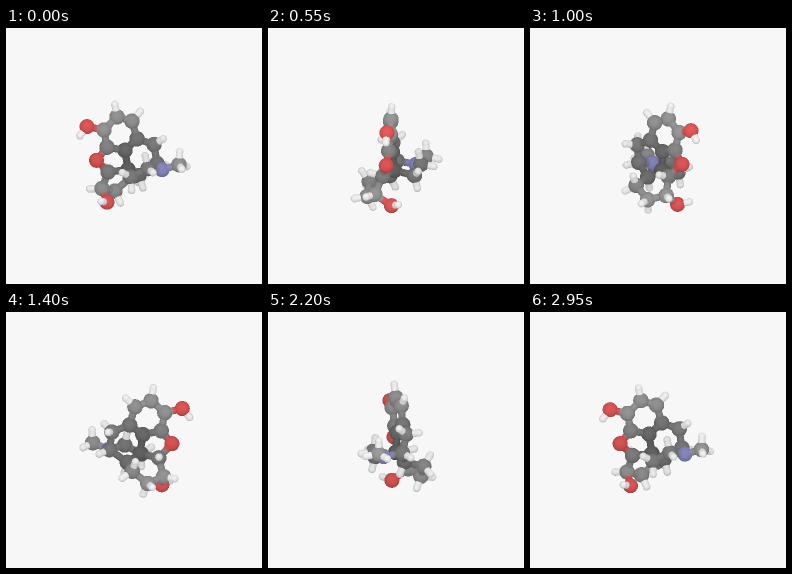
An HTML page with a canvas for the animation above (3 s loop, 256x256 px).

```html
<!DOCTYPE html>
<html lang="en">
<head>
<meta charset="utf-8">
<title>Rotating molecule</title>
<style>
html, body { margin: 0; width: 100%; height: 100%; overflow: hidden; background: #f7f7f7; }
canvas { display: block; width: 256px; height: 256px; }
</style>
</head>
<body>
<canvas id="stage" width="512" height="512"></canvas>
<script>
const LOOP = 3000, STEP = 50, SIZE = 512, SCALE = 2, TILT = 0.17;
const H_LENGTH = 13, BOND_MAX = 24.5, STICK = 3.6, BACK = 247;
// dim: how strongly the crowded middle darkens the colour
const KINDS = {
  C: { r: 7.7, rgb: [152, 152, 152], dim: 1 },
  O: { r: 7.5, rgb: [226, 88, 88], dim: 0.7 },
  N: { r: 7.5, rgb: [150, 150, 210], dim: 0.7 },
  H: { r: 3.8, rgb: [241, 241, 241], dim: 0.3 }
};

// kind, x, y, z, attached hydrogens
const heavy = [
  ['C', -2, 94, -5, 1], ['C', -17, 88.5, 2, 1], ['C', -30, 100.8, 7, 0],
  ['C', -27, 118.5, 4, 0], ['C', -9, 122.3, 0, 0], ['C', 3, 112, -7, 0],
  ['O', -47, 96.7, 11, 0], ['O', -37.5, 131.3, 6, 0], ['C', -26, 144.5, -3, 1],
  ['C', -32, 162, -9, 1], ['O', -27, 173, 7, 0], ['C', -19, 167, -23, 2],
  ['C', -4, 154.5, -27.5, 2], ['C', 5, 149, -9, 1], ['C', -6, 141.5, 1, 0],
  ['C', 23, 137, -9, 1], ['C', 20, 118.7, -12.5, 2], ['N', 28, 140, 9.5, 0],
  ['C', 45, 134.5, 13, 3], ['C', 14, 137, 21, 2], ['C', -3, 145.5, 21.5, 2]
];

const add = (a, b, k = 1) => a.map((v, i) => v + b[i] * k);
const dot = (a, b) => a[0] * b[0] + a[1] * b[1] + a[2] * b[2];
const unit = a => a.map(v => v / Math.hypot(...a));
const cross = (a, b) => [
  a[1] * b[2] - a[2] * b[1], a[2] * b[0] - a[0] * b[2], a[0] * b[1] - a[1] * b[0]
];

const atoms = heavy.map(([kind, x, y, z]) => ({ kind, p: [x, y - 128, z], near: [] }));
const bonds = [];

function link(a, b) {
  bonds.push([a, b]);
  a.near.push(b);
  b.near.push(a);
}

function addH(a, p) {
  const h = { kind: 'H', p, near: [] };
  atoms.push(h);
  link(a, h);
}

const towards = (a, b) => unit(add(b.p, a.p, -1));

function methylDirs(a) {
  const n = a.near[0], axis = towards(n, a);
  const sides = n.near.filter(b => b !== a).map(b => {
    const v = towards(n, b);
    return unit(add(v, axis, -dot(v, axis)));
  });
  const fans = sides.map(v => v.map(c => -c));
  fans.push(unit(add(sides[0], sides[1])));
  return fans.map(v => add(axis.map(c => c * 0.33), v, 0.94));
}

function hydrogenDirs(a, count) {
  if (count === 3) return methylDirs(a);
  const us = a.near.map(b => towards(a, b));
  const out = unit(us.reduce((s, u) => add(s, u, -1), [0, 0, 0]));
  if (count === 1) return [out];
  const side = unit(cross(us[0], us[1]));
  return [0.82, -0.82].map(k => add(out.map(c => c * 0.58), side, k));
}

for (let i = 0; i < heavy.length; i++) {
  for (let j = 0; j < i; j++) {
    if (Math.hypot(...add(atoms[i].p, atoms[j].p, -1)) < BOND_MAX) link(atoms[j], atoms[i]);
  }
}
heavy.forEach((row, i) => {
  if (!row[4]) return;
  const a = atoms[i];
  for (const d of hydrogenDirs(a, row[4])) addH(a, add(a.p, d, H_LENGTH));
});
addH(atoms[6], [-54, -22.5, 13]);
addH(atoms[10], [-33, 42.5, 17]);

const ctx = document.getElementById('stage').getContext('2d');
const image = ctx.createImageData(SIZE, SIZE);
const pixels = image.data;
const depth = new Float32Array(SIZE * SIZE);

function ball([x, y, z], radius, { rgb, dim }) {
  const cx = (128 + x) * SCALE, cy = (128 + y) * SCALE, r = radius * SCALE;
  const open = Math.min(1, Math.hypot(x, y - 6, z) / 42);
  const fade = 1 - dim * (0.42 * (1 - open) + 0.04 - z * 0.0015);
  for (let py = Math.ceil(cy - r - 0.5); py + 0.5 < cy + r; py++) {
    for (let px = Math.ceil(cx - r - 0.5); px + 0.5 < cx + r; px++) {
      const dx = (px + 0.5 - cx) / r, dy = (py + 0.5 - cy) / r;
      const rest = 1 - dx * dx - dy * dy;
      if (rest <= 0) continue;
      const nz = Math.sqrt(rest), d = z + nz * radius, at = py * SIZE + px;
      if (d <= depth[at]) continue;
      depth[at] = d;
      const light = (0.75 + 0.25 * nz - 0.06 * dy) * fade;
      for (let c = 0; c < 3; c++) pixels[at * 4 + c] = rgb[c] * light;
    }
  }
}

function stick(a, b) {
  const n = 18;
  for (let i = 0; i <= n; i++) {
    const p = add(a.view, add(b.view, a.view, -1), i / n);
    ball(p, STICK, KINDS[i * 2 < n ? a.kind : b.kind]);
  }
}

function draw(angle) {
  const c = Math.cos(angle), s = Math.sin(angle);
  pixels.fill(BACK);
  for (let i = 3; i < pixels.length; i += 4) pixels[i] = 255;
  depth.fill(-1e6);
  for (const a of atoms) {
    const [x, y, z] = a.p, front = z * c - x * s;
    a.view = [x * c + z * s, y + front * TILT, front - y * TILT];
  }
  for (const [a, b] of bonds) stick(a, b);
  for (const a of atoms) ball(a.view, KINDS[a.kind].r, KINDS[a.kind]);
  ctx.putImageData(image, 0, 0);
}

const start = performance.now();
let shown = -1;

function tick() {
  const step = Math.floor(((performance.now() - start) % LOOP) / STEP);
  if (step !== shown) {
    shown = step;
    draw(step * STEP / LOOP * 2 * Math.PI);
  }
  requestAnimationFrame(tick);
}
tick();
</script>
</body>
</html>
```
